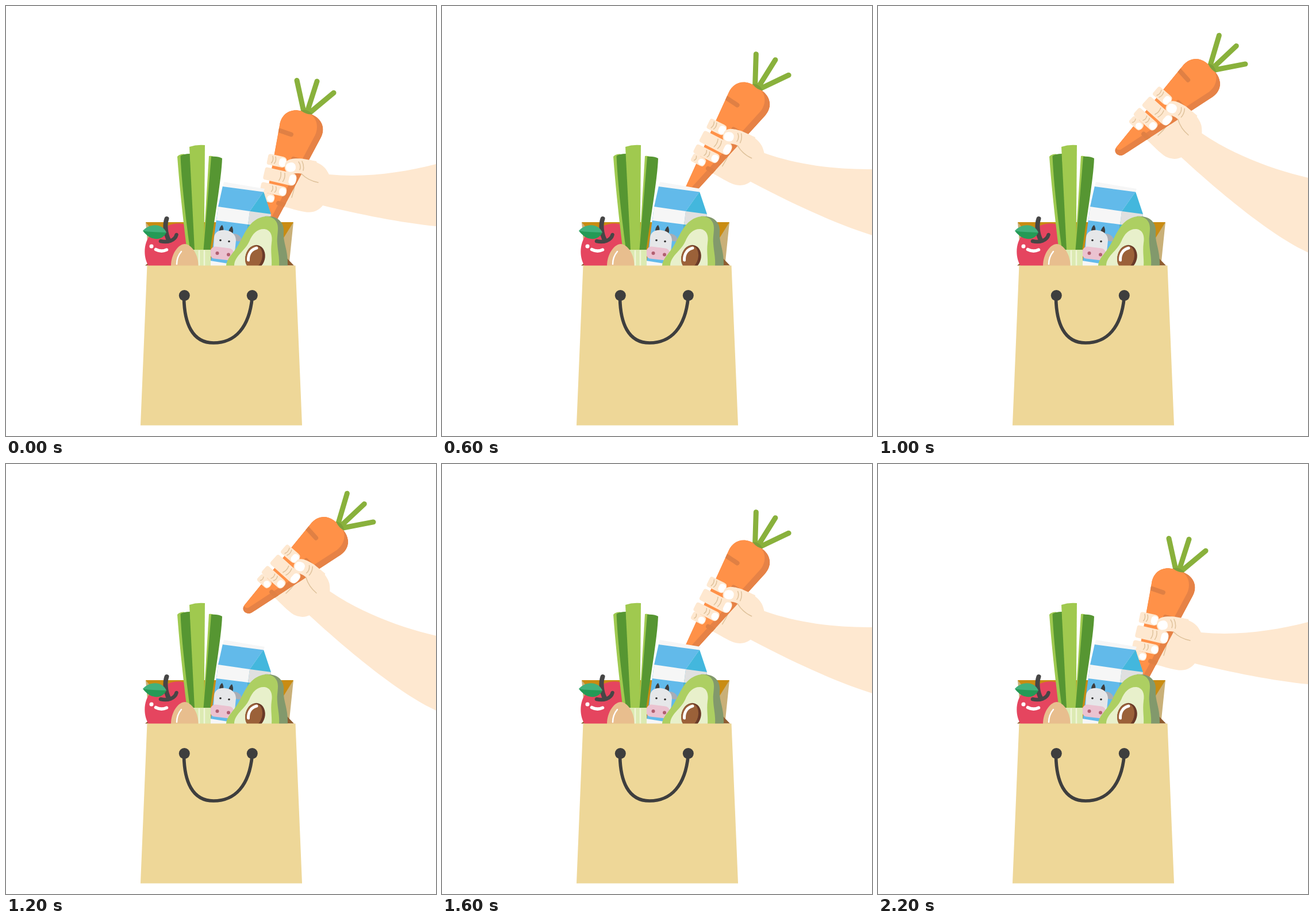
Write an HTML page that moves like this. It is 748 by 748 pixels and loops after 2.3 s.

```html
<!DOCTYPE html>
<html lang="en">
<head>
<meta charset="utf-8">
<title>Grocery bag</title>
<style>
  html, body { margin: 0; width: 100%; height: 100%; overflow: hidden; background: #fff; }
  svg { display: block; width: 100vw; height: 100vh; }
  .line { fill: none; stroke-linecap: round; stroke-linejoin: round; }
  .crease { fill: none; stroke: #dfc29b; stroke-width: 1.5; stroke-linecap: round; }
  .skin { fill: #fee8d0; }
  .nail { fill: #fff; }
</style>
</head>
<body>
<svg viewBox="0 0 748 748">
  <defs>
    <clipPath id="carrotClip">
      <path id="carrotShape" d="M476 207C479 189 492 180 508 181.5C520 183 530 187 537 191C552 200 555 215 548 229L461.500 391C457 400 441 398 443.500 386Z"/>
    </clipPath>
  </defs>

  <g id="bagBack">
    <path fill="#c98c13" d="M243 376H500L480 452H262Z"/>
    <path fill="#c9b078" d="M500 376L480 408L486 437L493 444ZM243 376L264 402L260 437L249 445Z"/>
    <path fill="#8f5d31" d="M486 436L501 451.5H486ZM260 436L242 451.5H260Z"/>
  </g>

  <g id="hand">
    <path class="skin" d="M497 266C515 262 545 270 555 282C559 287 561 291 562 293C625 299 690 290 748 275L860 245V380L835 384C770 393 650 371 551 347C545 355 535 360 522 358.5C505 356 490 350 478 348L480 300Z"/>
    <path class="crease" d="M503 308Q501 321 497 333"/>
    <path class="line" stroke="#89b13c" stroke-width="9" d="M506 129.500L518 184M541 131L524 184M570 151L528 186"/>
    <g clip-path="url(#carrotClip)">
      <use href="#carrotShape" fill="#e68246"/>
      <path fill="#ff9148" d="M470 207C479 189 492 178 508 180C516 182 523 184 528 187C541 195 544 210 538 224L452 386C449 390 445 389 440 386Z"/>
      <path class="line" stroke="#e08044" stroke-width="8" d="M470 214.500L496 223.500M500 266L518 271M474 343L492 348"/>
    </g>
    <path fill="#7da03a" d="M513 182Q522 177 533 188Q524 190 513 182Z"/>
    <g id="fingers"></g>
    <path class="skin" d="M486 273C490 265 502 265 515 265.500L540 270L548 302C535 303 522 296 515 292C505 289 497 294 490 290C484 286 484 279 486 273Z"/>
    <rect class="nail" x="487" y="272.500" width="17" height="16" rx="7" transform="rotate(-8 495 281)"/>
    <path class="crease" d="M509 271Q514 278 511 285M515 270Q519 278 517 286M514 292C522 300 532 305 543 307"/>
  </g>

  <g id="milk">
    <path fill="#62baea" d="M377 313L448 323L424 357L411 452H355L369 349Z"/>
    <path fill="#43b7dd" d="M448 323L461 362L450 452H411L424 357Z"/>
    <path fill="#f6f6f6" d="M379 306L450 318L448 323.500L377 314ZM369 349L424 357L421 380L366 373ZM355 443L386 448V452H355Z"/>
    <path fill="#e0e0e0" d="M424 357L461 362L458 385L421 380Z"/>
    <path fill="#a9adb5" d="M396 396C404 396 410 402 410 408C405 411 399 409 396 405Z"/>
    <path fill="#3e3e3e" d="M371 392C371 387 373 383 376 381C378 384 379 388 378 392ZM387 393C388 389 390 385 393 383C395 387 396 392 394 396Z"/>
    <path fill="#e6e7e9" d="M361 424L362 403C363 393 371 389 381 390C393 391 400 398 400 408L398 428Z"/>
    <rect fill="#ebc2d0" x="355.500" y="420" width="40" height="21" rx="8" transform="rotate(7 376 431)"/>
    <g fill="#b25f70"><circle cx="367.500" cy="430" r="3"/><circle cx="387" cy="432.500" r="3"/></g>
    <g fill="#333"><circle cx="373" cy="407.500" r="1.800"/><circle cx="388" cy="409.500" r="1.800"/></g>
  </g>

  <g id="apple">
    <path fill="#e5455f" d="M248 452C239 438 238 413 252 397C262 386 274 386 282 382C295 376 312 377 322 386L330 452Z"/>
    <path class="line" stroke="#464646" stroke-width="8" d="M279.500 370C276 380 277 395 283 407"/>
    <path class="line" stroke="#464646" stroke-width="6.500" d="M269 409C281 412 294 408 296.500 398"/>
    <path fill="#42b17c" d="M238 391C248 379 271 376 279 394Q258 400 238 391Z"/>
    <path fill="#249a56" d="M238 391C254 394 266 393 279 394C272 409 252 410 238 391Z"/>
    <circle fill="#fff" cx="253" cy="418" r="3.500"/>
    <path class="line" stroke="#fff" stroke-width="5.500" d="M260.500 423.500Q270 428.500 279.500 424"/>
  </g>

  <g id="leek">
    <path fill="#dceab2" d="M317 424H356V452H317Z"/>
    <path class="line" stroke="#f0f5d8" stroke-width="2.500" d="M336 426V452M345 426V452"/>
    <path fill="#9fca50" d="M298 262Q302 257 310 257.500L325 424H314.500Q303 330 298 262Z"/>
    <path fill="#569632" d="M303.500 261Q309 257 320 257L331 424H320Q306 320 303.500 261Z"/>
    <path fill="#a0c94f" d="M319 245Q332 240.500 346 242L344.500 424H328Z"/>
    <path fill="#9fca50" d="M353 261Q357 260 361 262L349 424H343Z"/>
    <path fill="#569632" d="M357 262Q368 261 376 265C375 300 361 380 355.500 424H343.500Z"/>
  </g>

  <g id="egg">
    <path fill="#e8be8e" d="M287 452C287 431 300 414 311 414C322 414 335 432 334.500 452Z"/>
    <path class="line" stroke="#fff" stroke-width="2.500" d="M297 449C297 441 300 433 305 427"/>
  </g>

  <g id="avocado">
    <path fill="#82996c" d="M450 366C474 364 485 378 483 395C482 412 491 425 490 452H450Z"/>
    <path fill="#adcf62" d="M383 452C384 438 397 429 405 414C416 394 422 377 440 369C458 361 473 370 473 386C473 397 471 402 472 414C473 428 476 438 475 452Z"/>
    <path fill="#e8f0cb" d="M397 452C397 435 415 427 423 410C429 395 438 387 450 388C461 390 464 400 462 412C460 428 463 440 462 452Z"/>
    <ellipse fill="#693a28" cx="433.500" cy="437" rx="17" ry="21.500" transform="rotate(14 433.500 437)"/>
    <ellipse fill="#9b6139" cx="431" cy="437" rx="14.500" ry="20.500" transform="rotate(16 431 437)"/>
    <path class="line" stroke="#fff" stroke-width="5" d="M421.500 442C421 431 427 423 436 421"/>
  </g>

  <g id="bagFront">
    <path fill="#eed798" d="M245.500 451.500H503.500L515 729.500H234Z"/>
    <path class="line" stroke="#3e3e3e" stroke-width="5.700" d="M309.500 504C309.500 552 324 586 361 586C398 586 424 560 428.500 504"/>
    <g fill="#3e3e3e"><circle cx="310.300" cy="503.500" r="9.500"/><circle cx="428.300" cy="503.500" r="9.500"/></g>
  </g>
</svg>
<script>
const STEP = 100, STEPS = 23, LAST = STEPS - 1;
const hand = document.getElementById('hand');

// A finger runs from its knuckle to its nail; creases are distances along it.
function finger(x1, y1, x2, y2, width, creases) {
  const length = Math.hypot(x2 - x1, y2 - y1);
  const angle = Math.atan2(y2 - y1, x2 - x1) * 180 / Math.PI;
  const h = width / 2;
  const lines = creases.map(x =>
    `<path class="crease" d="M${x} ${-h + 3}Q${x + 3} 0 ${x} ${h - 4}"/>`).join('');
  return `<g transform="translate(${x1} ${y1}) rotate(${angle})">
    <path class="skin" d="M4 ${-h}H${length - h * .8}Q${length} ${-h} ${length} 0T${length - h * .8} ${h}H4Q0 ${h} 0 ${h - 4}V${4 - h}Q0 ${-h} 4 ${-h}Z"/>
    <rect class="nail" x="${length - 13}" y="${-h + 2.5}" width="12" height="${width - 4}" rx="5.5"/>${lines}</g>`;
}

document.getElementById('fingers').innerHTML =
  finger(442, 330, 467, 336, 15, [6]) +
  finger(443, 314, 488, 324, 17, [20, 26]) +
  finger(449, 290.5, 505, 303.5, 22, [28, 35]) +
  finger(455, 266, 488, 273, 19, [8, 13]);

// Poses of the hand: step, angle, x, y
const poses = [
  [0, 0, 495, 281],
  [4, 9, 495, 248.3],
  [6, 14.2, 498.5, 227.8],
  [8, 22.2, 503, 201],
  [10, 28.9, 510.5, 178.5],
  [11, 32, 515, 168.5]
];

function slope(i, c) {
  const a = poses[Math.max(0, i - 1)], b = poses[Math.min(poses.length - 1, i + 1)];
  return (b[c] - a[c]) / (b[0] - a[0]);
}

// Cubic Hermite interpolation of one pose component
function value(step, c) {
  let i = 0;
  while (i < poses.length - 2 && step >= poses[i + 1][0]) i++;
  const a = poses[i], b = poses[i + 1], d = b[0] - a[0];
  const u = (step - a[0]) / d, v = 1 - u;
  return v * v * (1 + 2 * u) * a[c] + u * u * (1 + 2 * v) * b[c]
    + d * u * v * (v * slope(i, c) - u * slope(i + 1, c));
}

function draw(ms) {
  const index = Math.floor(ms / STEP) % STEPS;
  const step = Math.min(index, LAST - index);
  const [angle, x, y] = [1, 2, 3].map(c => value(step, c));
  hand.setAttribute('transform', `translate(${x} ${y}) rotate(${angle}) translate(-495 -281)`);
}

let start;
function tick(now) {
  start ??= now;
  draw(Math.max(0, now - start));
  requestAnimationFrame(tick);
}
draw(0);
requestAnimationFrame(tick);
</script>
</body>
</html>
```
